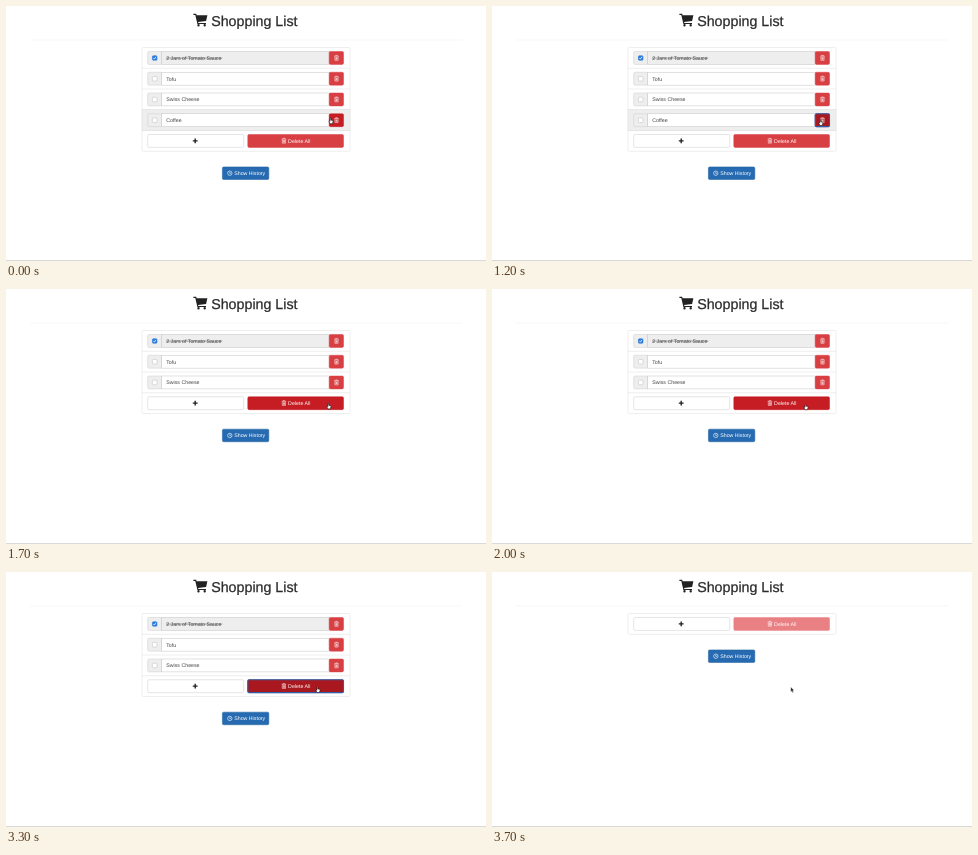
Animation, 480 px wide and 255 px high, one loop 3800 ms. Source, as an HTML page:

```html
<!DOCTYPE html>
<html lang="en">
<head>
<meta charset="utf-8">
<title>Shopping List</title>
<style>
  html, body { margin: 0; width: 100%; height: 100%; overflow: hidden; background: #fff; }
  svg { display: block; width: 480px; height: 255px; }
  text { font: 5.28px "Liberation Sans", Arial, sans-serif; text-rendering: geometricPrecision; white-space: pre; }
  .title { font-size: 14.25px; fill: #2b2b2b; stroke: #2b2b2b; stroke-width: .25px; }
</style>
</head>
<body>
<svg id="stage" viewBox="0 0 480 255"></svg>
<script>
const LOOP = 3800, STEP = 100;
const TOP = 41.5, PITCH = 20.75, HEIGHT = 12.9;
const RED = '#d83f43', HOVER = '#c51d23', PRESSED = '#a9181e', FADED = '#e98184', BLUE = '#266bb1';
const ITEMS = ['2 Jars of Tomato Sauce', 'Tofu', 'Swiss Cheese', 'Coffee'];
const REMOVE_AT = 1300, CLEAR_AT = 3400, FIRST_PRESS = 1100, SECOND_PRESS = 3200;

// Pointer path: time, x, y
const PATH = [
  [0, 325, 115], [100, 328.8, 116.7], [1500, 328.8, 116.7], [2000, 314, 118],
  [2400, 314, 118], [2700, 312, 117.8], [3400, 312, 117.8], [3700, 298.8, 117.8]
];

const box = (x, y, w, h, fill, stroke = fill, r = 1.3) =>
  `<rect x="${x}" y="${y}" width="${w}" height="${h}" rx="${r}" fill="${fill}" stroke="${stroke}" stroke-width=".5"/>`;
const label = (x, y, str, fill = '#fff', extra = '') =>
  `<text x="${x}" y="${y}" fill="${fill}" ${extra}>${str}</text>`;
const line = (x1, x2, y, color, w = .5) =>
  `<path d="M${x1} ${y}H${x2}" stroke="${color}" stroke-width="${w}"/>`;
const shape = (x, y, attrs) => `<path transform="translate(${x} ${y})" ${attrs}/>`;

const trash = (x, y) => shape(x, y,
  'd="M0 1H4.6M1.5 .9V.2H3.1V.9M.7 1.3V5.1H3.9V1.3M1.7 2V4.4M2.3 2V4.4M2.9 2V4.4" fill="none" stroke="#fff" stroke-width=".5"');
const ring = (x, y, w) =>
  `<rect x="${x}" y="${y}" width="${w}" height="${HEIGHT}" rx="1.3" fill="none" stroke="#2f5ea8" stroke-width="1.1"/>`;

function checkbox(y, checked) {
  const x = 146.4;
  return checked
    ? box(x, y, 4.6, 4.6, '#2a7de1', '#1f6fd0', 1) +
      shape(x, y, 'd="M1.1 2.4L2 3.4L3.5 1.1" fill="none" stroke="#fff" stroke-width=".75"')
    : box(x, y, 4.6, 4.6, '#fff', '#bbb', 1);
}

function item(name, i, t) {
  const top = TOP + i * PITCH, y = top + 4;
  const done = i === 0, hovered = i === 3, pressed = hovered && t >= FIRST_PRESS;
  return (hovered ? box(136, top, 208, PITCH, '#eeeeee', '#ddd', 0) : '') +
    box(141.7, y, 14, HEIGHT, '#eee', '#ccc') +
    box(155.7, y, 167.5, HEIGHT, done ? '#eee' : '#fff', '#c4c4c4', 0) +
    checkbox(y + 4.2, done) +
    label(160.2, y + 8.3, name, '#444') +
    (done ? line(160, 216.3, y + 6.6, '#444') : '') +
    box(323.2, y, 14.3, HEIGHT, pressed ? PRESSED : hovered ? HOVER : RED) +
    trash(328.2, y + 3.7) +
    (pressed ? ring(323.2, y, 14.3) : '');
}

function buttons(count, t) {
  const y = TOP + count * PITCH + 4, historyY = y + 32.4;
  const hovered = count === 3, pressed = hovered && t >= SECOND_PRESS;
  const fill = count === 0 ? FADED : pressed ? PRESSED : hovered ? HOVER : RED;
  return box(141.7, y, 96, HEIGHT, '#fff', '#ccc') +
    shape(189.2, y + 6.4, 'd="M-2.4 0H2.4M0 -2.4V2.4" stroke="#222" stroke-width="1.4"') +
    box(241.8, y, 95.7, HEIGHT, fill) +
    trash(275.6, y + 3.6) + label(282.1, y + 8.3, 'Delete All') +
    (pressed ? ring(241.8, y, 95.7) : '') +
    box(216.4, historyY, 46.4, HEIGHT - .3, BLUE, '#1f5c9a') +
    shape(223.8, historyY + 6.3, 'd="M2.2 0A2.2 2.2 0 1 1 -2.2 0A2.2 2.2 0 1 1 2.2 0M0 -1.3V.2H1.1" fill="none" stroke="#fff" stroke-width=".6"') +
    label(228.2, historyY + 8.2, 'Show History');
}

function pointer(t) {
  const next = PATH.findIndex(p => p[0] > t);
  const b = next < 0 ? PATH.at(-1) : PATH[next], a = next < 0 ? b : PATH[next - 1];
  const k = a === b ? 0 : (t - a[0]) / (b[0] - a[0]);
  const x = a[1] + (b[1] - a[1]) * k, y = a[2] + (b[2] - a[2]) * k;
  return t >= CLEAR_AT
    ? shape(x, y, 'd="M0 -2.8V2.1L1.1 1.1L1.9 2.9L2.7 2.5L1.9 .8H3.3Z" transform-origin="0 0" fill="#111" stroke="#fff" stroke-width=".35"')
    : shape(x, y, 'd="M-1 -2.8Q-.5 -3.3 -.1 -2.7V-.9L1.7 -.5Q2.2 -.3 2.1 .3L1.5 2.7H-.8L-2.1 .7Q-2.2 0 -1.5 .1L-1 .5Z" fill="#fff" stroke="#111" stroke-width=".6"');
}

function header() {
  return shape(187.4, 7, 'd="M0 .7H2.7L3.3 2.2H14L12.7 7.9L4.7 8.9L5 9.9H12.6V11H4L1.9 2H0ZM3.9 12.3a1.2 1.2 0 1 0 2.4 0a1.2 1.2 0 1 0 -2.4 0M10.1 12.3a1.2 1.2 0 1 0 2.4 0a1.2 1.2 0 1 0 -2.4 0" fill="#222"') +
    label(205.2, 20.4, 'Shopping List', '#2b2b2b', 'class="title"') +
    line(24, 456, 34, '#eee') + line(0, 480, 254.5, '#d9d9d9', 1);
}

function scene(t) {
  const count = t < REMOVE_AT ? 4 : t < CLEAR_AT ? 3 : 0;
  let out = header() + box(136, TOP, 208, (count + 1) * PITCH, '#fff', '#ddd');
  for (let i = 1; i <= count; i++) out += line(136, 344, TOP + i * PITCH, '#ddd');
  ITEMS.slice(0, count).forEach((name, i) => out += item(name, i, t));
  return out + buttons(count, t) + pointer(t);
}

const stage = document.getElementById('stage');
const start = performance.now();
let shown = -1;
function tick() {
  const t = Math.floor((performance.now() - start) % LOOP / STEP) * STEP;
  if (t !== shown) stage.innerHTML = scene(shown = t);
  requestAnimationFrame(tick);
}
tick();
</script>
</body>
</html>
```
